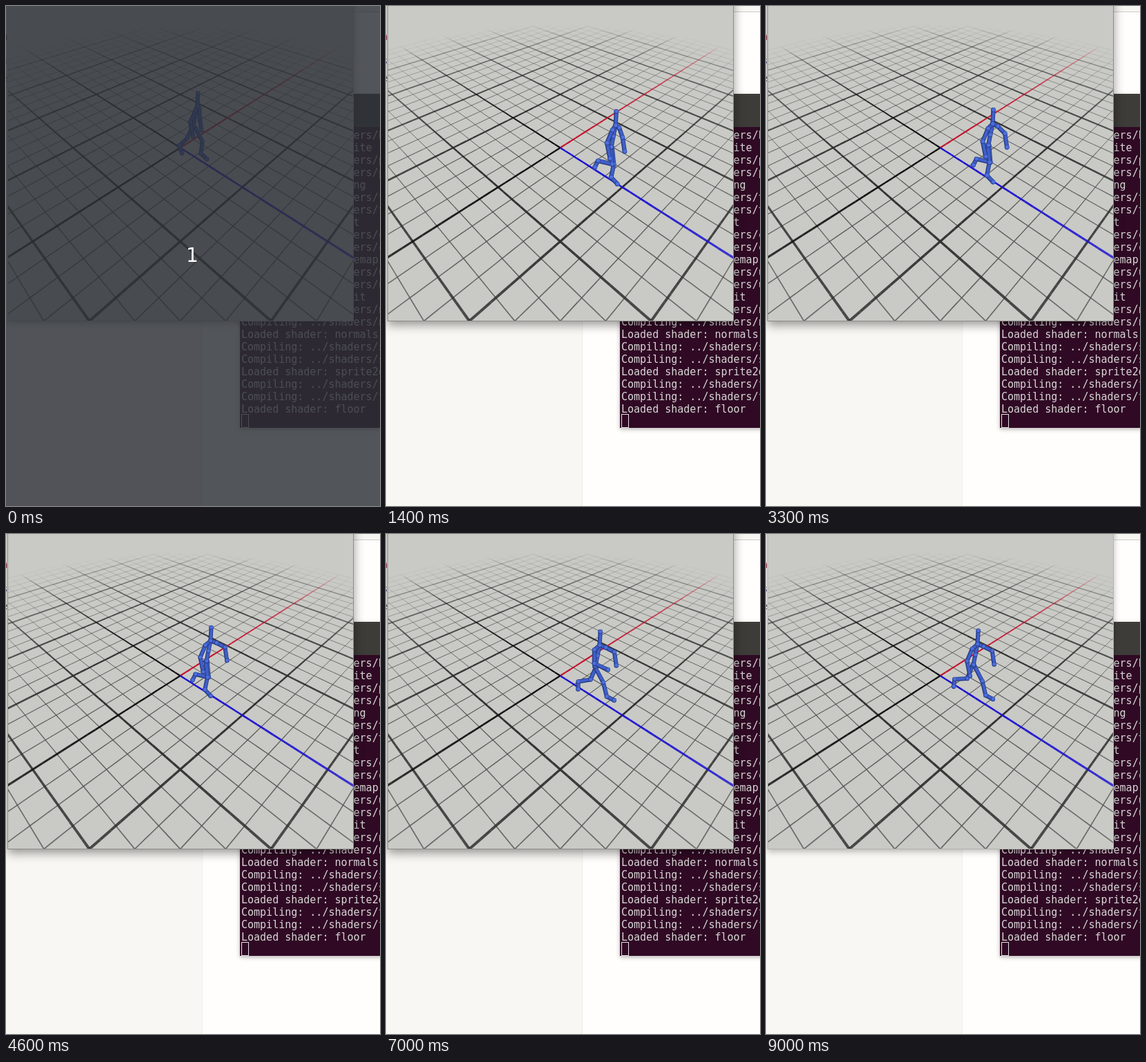
Animation, 542 px wide and 723 px high, one loop 9.1 s. Source, as an HTML page with a canvas:

```html
<!DOCTYPE html>
<html lang="en">
<head>
<meta charset="utf-8">
<title>Walk cycle viewer</title>
<style>
html, body { margin: 0; width: 100%; height: 100%; overflow: hidden; }
#stage { position: relative; width: 542px; height: 723px; overflow: hidden; background: #fffefc; }
#stage > * { position: absolute; box-sizing: border-box; }
#side { left: 0; top: 0; width: 285px; height: 723px; background: #f8f7f3; border-right: 1px solid #efeeea; }
#strip { left: 285px; top: 0; width: 257px; height: 9px; background: #f7f6f3; border-bottom: 1px solid #cfcecb; }
.bit { left: -6px; font: 14px "DejaVu Sans Mono", monospace; line-height: 18px; }
#term { left: 339px; top: 127px; width: 210px; height: 483px; background: #300a24;
  box-shadow: 0 2px 6px rgba(0,0,0,.3); overflow: hidden; }
#bar { height: 48px; background: #3d3c39; }
#term pre { margin: 3px 0 0 2px; font: 15px/18px "DejaVu Sans Mono", monospace; color: #d9d6d8; }
#caret { position: absolute; left: 2px; top: 463px; width: 9px; height: 18px; border: 1px solid #e4e0e2; }
#view { left: 2px; top: -20px; width: 502px; height: 476px; background: #c9cac5;
  border: 1px solid #8d8d89; box-shadow: 0 5px 14px rgba(0,0,0,.42); }
#view.idle { border-color: #b3b3af; box-shadow: 0 3px 9px rgba(0,0,0,.28); }
canvas { left: 0; top: 0; }
#veil { inset: 0; background: rgba(44,48,54,.82); }
#veil span { position: absolute; left: 0; width: 540px; top: 344px; text-align: center;
  font: 28px/34px "DejaVu Sans", sans-serif; color: #fff; }
</style>
</head>
<body>
<div id="stage">
  <div id="side"></div>
  <div id="strip"></div>
  <div class="bit" style="top:35px;color:#a33a52">a</div>
  <div class="bit" style="top:70px;color:#42427c">s</div>
  <div class="bit" style="top:95px;color:#555">e</div>
  <div id="term"><div id="bar"></div><pre id="log"></pre><div id="caret"></div></div>
  <div id="view"></div>
  <canvas id="scene" width="542" height="456"></canvas>
  <div id="veil"><span>1</span></div>
</div>
<script>
const $ = id => document.getElementById(id);
const LOOP = 9100, STEP = 100;
const mix = (a, b, k) => a + (b - a) * k;

// Terminal log
const compile = name => `Compiling: ../shaders/${name}`;
const log = [compile('basic.frag'), 'Loaded shader: sprite'];
for (const name of ['phong', 'text', 'cubemap', 'unlit', 'normals', 'sprite2d', 'floor'])
  log.push(compile(name + '.vert'), compile(name + '.frag'), 'Loaded shader: ' + name);
$('log').textContent = log.join('\n');

// Floor coordinates: p runs along the blue axis, q against the red one
const depth = (p, q) => 1 - .137 * (p + q);
function floorPoint(p, q) {
  const w = depth(p, q);
  return [252.5 + 77.6 * (p - q) / w, (205 + 21.1 * (p + q)) / w];
}

function drawLine(c, at, from, to, color, width) {
  const d = .1;
  c.strokeStyle = color;
  for (let i = 0; i < Math.round((to - from) / d); i++) {
    const s = from + i * d, a = at(s), b = at(s + d), mid = at(s + d / 2);
    if (depth(...a) < .28 || depth(...b) < .28) continue;
    c.globalAlpha = Math.max(0, 1 - (mid[0] ** 2 + mid[1] ** 2) / 26);
    c.lineWidth = width / depth(...mid);
    c.beginPath();
    c.moveTo(...floorPoint(...a));
    c.lineTo(...floorPoint(...b));
    c.stroke();
  }
  c.globalAlpha = 1;
}

function clipView(c) {
  c.beginPath();
  c.rect(3, 0, 500, 455);
  c.clip();
}

function makeFloor() {
  const layer = document.createElement('canvas');
  layer.width = 542;
  layer.height = 456;
  const c = layer.getContext('2d');
  clipView(c);
  const alongP = k => s => [s, k], alongQ = k => s => [k, s];
  const edge = 5.1, cells = 4;
  for (const major of [false, true])
    for (let i = -5 * cells; i <= 5 * cells; i++) {
      if ((i % cells === 0) !== major || i === 0) continue;
      for (const axis of [alongP, alongQ])
        drawLine(c, axis(i / cells), -edge, edge, major ? '#2b2b2b' : '#505050', major ? 2.4 : 1);
    }
  drawLine(c, alongP(0), -edge, 0, '#0c0c0c', 2.2);
  drawLine(c, alongQ(0), 0, edge, '#0c0c0c', 2.2);
  drawLine(c, alongQ(0), -edge, 0, '#c4102c', 2.3);
  drawLine(c, alongP(0), 0, edge, '#1a10d0', 2.3);
  return layer;
}

// Laps walked along the blue axis by a given time
const pace = [[0, .115], [1400, 1.557], [3300, 3.525], [4600, 5.277], [5600, 6.586], [7000, 7.382], [9000, 9.358]];
function lapsAt(t) {
  const i = Math.max(1, pace.findIndex(([end]) => t <= end));
  const [t0, a] = pace[i - 1], [t1, b] = pace[i];
  return mix(a, b, (t - t0) / (t1 - t0));
}

// Joint chain from a start point; angles lean forward from straight down
function chain(start, bones, skew = 0) {
  const pts = [start];
  for (const [angle, len] of bones) {
    const [x, y] = pts[pts.length - 1], dx = Math.sin(angle) * len;
    pts.push([x + dx, y + Math.cos(angle) * len + skew * dx]);
  }
  return pts;
}

function leg(hip, turn) {
  const thigh = .1 + .5 * Math.sin(turn);
  const shin = thigh - .3 - 1.3 * Math.max(0, Math.cos(turn));
  return chain(hip, [[thigh, 21], [shin, 18], [shin + 1.1, 10]], .3);
}

function walker(t) {
  const laps = lapsAt(t), turn = Math.PI * (4.57 * laps - .12);
  const spread = Math.min(1, t / 4600);
  const bent = Math.exp(-(((t - 6300) / 1000) ** 4));
  const hip = [0, -42.5], neck = [5.5, -70];
  const open = mix(.4, 1, spread);
  const left = [neck[0] - 7 * open, neck[1] + 6], right = [neck[0] + 8 * open, neck[1] + 3];
  const limbs = [
    leg([1, -42], turn),
    leg([-1, -42], turn + Math.PI),
    [neck, ...chain(right, [[1.1 * spread, 13], [.15, 18]])],
    [hip, [2.5, -56], neck, [neck[0] + 1, neck[1] - 18]],
    [neck, ...chain(left, [[mix(-.4, .1, bent), 18], [mix(.2, 1.4, bent), 20]])]
  ];
  const z = .08 + 1.37 * (laps % 1), s = 1 / depth(z, 0), [gx, gy] = floorPoint(z, 0);
  return { s, limbs: limbs.map(pts => pts.map(([x, y]) => [gx + x * s, gy + y * s])) };
}

function drawWalker(c, { limbs, s }) {
  c.lineCap = c.lineJoin = 'round';
  const stroke = (pts, color, width, shift = 0) => {
    c.strokeStyle = color;
    c.lineWidth = width * s;
    c.beginPath();
    pts.forEach(([x, y]) => c.lineTo(x + shift, y - shift));
    c.stroke();
  };
  const ball = ([x, y], r, color, shift = 0) => {
    c.fillStyle = color;
    c.beginPath();
    c.arc(x + shift, y - shift, r * s, 0, 7);
    c.fill();
  };
  for (const pts of limbs) {
    stroke(pts, '#27397f', 5.6);
    stroke(pts, '#3f60cb', 3.6, .3);
    for (const p of pts) {
      ball(p, 3.1, '#2e4599');
      ball(p, 2.3, '#4d70df', .3);
    }
  }
}

const ctx = $('scene').getContext('2d');
const floor = makeFloor();
clipView(ctx);

let start, shown = -1;
function tick(now) {
  start ??= now;
  const t = Math.floor((now - start) % LOOP / STEP) * STEP;
  if (t !== shown) {
    shown = t;
    $('veil').style.display = t < 100 ? 'block' : 'none';
    $('view').className = t < 100 || t >= 8900 ? 'idle' : '';
    ctx.clearRect(0, 0, 542, 456);
    ctx.drawImage(floor, 0, 0);
    drawWalker(ctx, walker(t));
  }
  requestAnimationFrame(tick);
}
requestAnimationFrame(tick);
</script>
</body>
</html>
```
